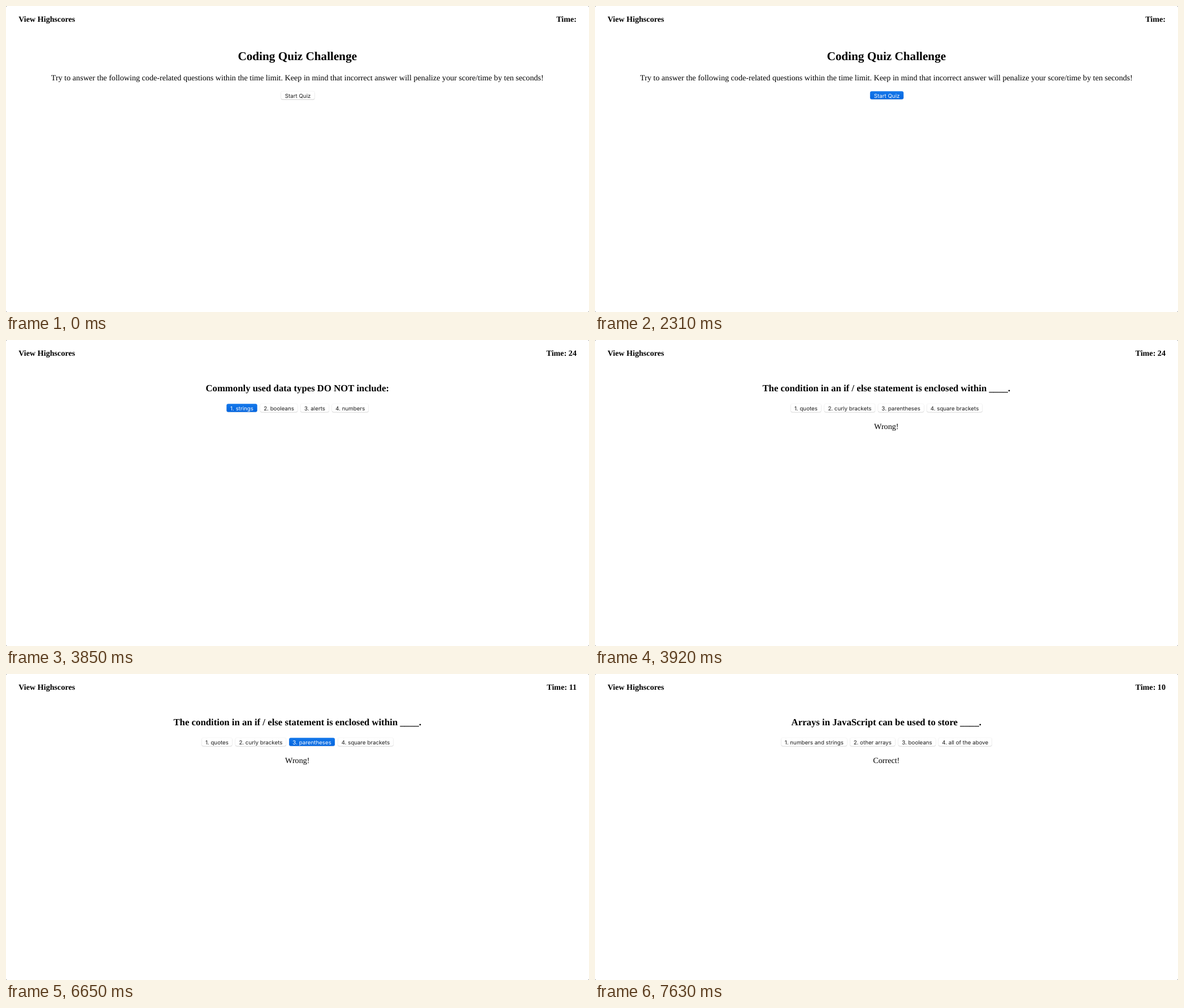
Animation of 1032x543 px, one loop 8 s. Source, as an HTML page:

```html
<!DOCTYPE html>
<html lang="en">
<head>
<meta charset="utf-8">
<title>Coding Quiz</title>
<style>
  html, body { margin: 0; width: 100%; height: 100%; overflow: hidden; background: #fff; }
  svg { display: block; width: 1032px; height: 543px; }
  text { font-family: "Liberation Serif", "Times New Roman", serif; font-size: 14.13px; text-rendering: geometricPrecision; }
  .mid { text-anchor: middle; }
  .end { text-anchor: end; }
  .bold, .title, .question { font-weight: 700; }
  .title { font-size: 21.2px; }
  .question { font-size: 16.78px; }
  .label { font-family: Inter, Roboto, sans-serif; font-size: 9.75px; fill: #1c1c1c; }
  .pressed .label { fill: #fff; }
  .shadow { fill: #000; fill-opacity: .13; }
  .edge { fill: #000; fill-opacity: .07; }
  .face { fill: #fff; }
  .pressed .shadow { fill-opacity: .06; }
  .pressed .edge { fill: none; }
  .pressed .face { fill: url(#blue); }
</style>
</head>
<body>
<svg id="stage" viewBox="0 0 1032 543">
  <defs>
    <linearGradient id="blue" x2="0" y2="1">
      <stop offset="0" stop-color="#1578ea"/>
      <stop offset="1" stop-color="#0365df"/>
    </linearGradient>
  </defs>
  <path fill="#777" d="M0 0H2.2Q0 0 0 2.2ZM1032 0V2.2Q1032 0 1029.8 0ZM0 543V540.8Q0 543 2.2 543ZM1032 543H1029.8Q1032 543 1032 540.8Z"/>
  <text class="bold" x="22.2" y="27.9">View Highscores</text>
  <text class="bold end" id="timer" x="1010" y="27.9">Time:</text>
</svg>
<script>
const LOOP = 8000;
const CENTER = 515.8;
const stage = document.getElementById('stage');
const timer = document.getElementById('timer');

function add(parent, tag, attrs = {}, content = '') {
  const node = document.createElementNS('http://www.w3.org/2000/svg', tag);
  for (const key in attrs) node.setAttribute(key, attrs[key]);
  node.textContent = content;
  return parent.appendChild(node);
}

function addLine(parent, style, y, content) {
  add(parent, 'text', { class: style + ' mid', x: CENTER, y }, content);
}

function addButton(parent, y, [left, right, label]) {
  const button = add(parent, 'g');
  const box = (name, grow, drop) => add(button, 'rect', {
    class: name, x: left - grow, y: y - grow + drop,
    width: right - left + 2 * grow, height: 14.4 + 2 * grow, rx: 3 + grow
  });
  box('shadow', 0.2, 0.9);
  box('edge', 0.5, 0);
  box('face', 0, 0);
  add(button, 'text', { class: 'label mid', x: (left + right) / 2, y: y + 11.4 }, label);
  return button;
}

// Each scene lasts until `end`; its `choice` is highlighted from `press`.
const scenes = [
  {
    end: 2380, press: 2310, choice: 0, buttonY: 151.2,
    title: 'Coding Quiz Challenge',
    intro: 'Try to answer the following code-related questions within the time limit. Keep in mind that incorrect answer will penalize your score/time by ten seconds!',
    buttons: [[486.9, 546.2, 'Start Quiz']]
  },
  {
    end: 3920, press: 3850, choice: 0,
    question: 'Commonly used data types DO NOT include:',
    buttons: [[390.4, 444.7, '1. strings'], [450, 516, '2. booleans'], [521.2, 571.8, '3. alerts'], [577, 641.6, '4. numbers']]
  },
  {
    end: 6720, press: 6650, choice: 2,
    question: 'The condition in an if / else statement is enclosed within ____.',
    buttons: [[346.6, 400.2, '1. quotes'], [406, 495.8, '2. curly brackets'], [501.1, 582.1, '3. parentheses'], [587.4, 685.6, '4. square brackets']],
    verdict: 'Wrong!'
  },
  {
    end: LOOP, press: LOOP, choice: 0,
    question: 'Arrays in JavaScript can be used to store ____.',
    buttons: [[329.8, 446, '1. numbers and strings'], [451.4, 531.2, '2. other arrays'], [537, 603, '3. booleans'], [608, 702.5, '4. all of the above']],
    verdict: 'Correct!'
  }
];

for (const scene of scenes) {
  const group = scene.group = add(stage, 'g');
  if (scene.title) addLine(group, 'title', 96, scene.title);
  if (scene.intro) addLine(group, 'plain', 131.7, scene.intro);
  if (scene.question) addLine(group, 'question', 90.8, scene.question);
  if (scene.verdict) addLine(group, 'plain', 157.7, scene.verdict);
  const nodes = scene.buttons.map(spec => addButton(group, scene.buttonY || 113.3, spec));
  scene.target = nodes[scene.choice];
}

// The wrong answer costs ten seconds, shown at the next tick.
function timeLeft(t) {
  if (t < 3430) return '';
  const ticks = Math.floor((t - 3430) / 1050);
  return ' ' + (24 - ticks - (ticks > 0 ? 10 : 0));
}

const start = performance.now();

function draw() {
  const t = (performance.now() - start) % LOOP;
  const current = scenes.find(scene => t < scene.end);
  for (const scene of scenes) {
    scene.group.style.display = scene === current ? '' : 'none';
  }
  current.target.classList.toggle('pressed', t >= current.press);
  timer.textContent = 'Time:' + timeLeft(t);
  requestAnimationFrame(draw);
}
draw();
</script>
</body>
</html>
```
